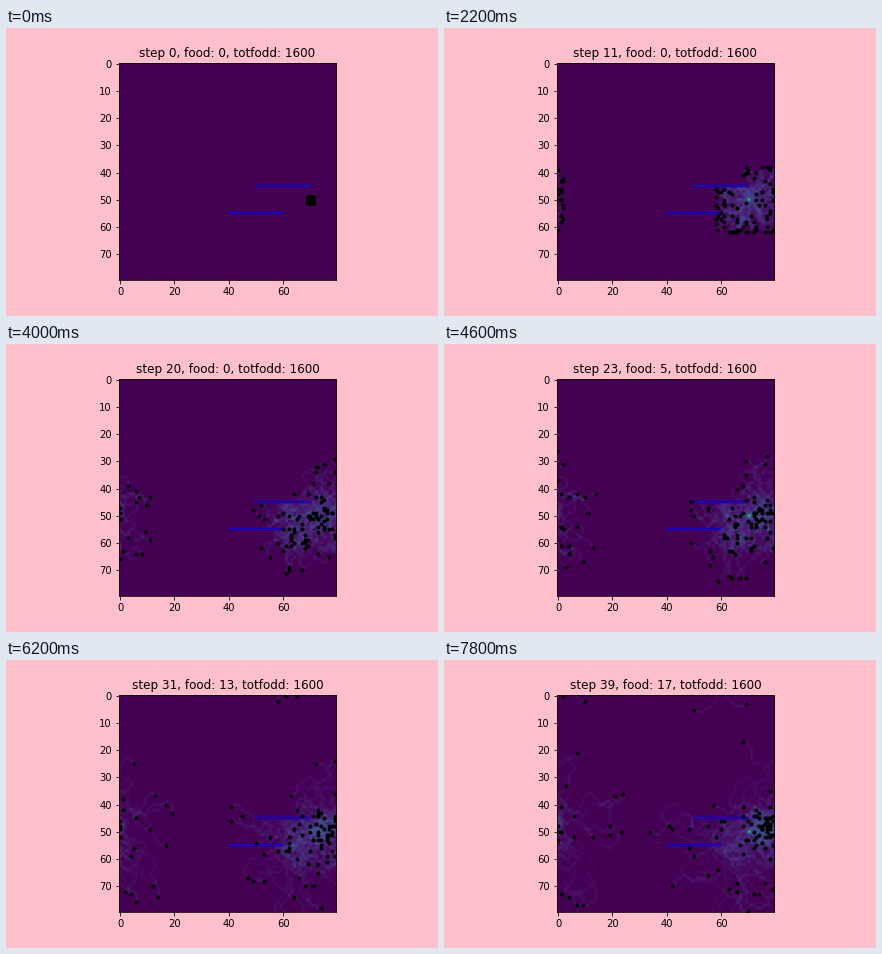
Write a matplotlib script that moves like this. It is 432x288 px and loops after 8 s.

```python
import numpy as np
import matplotlib.pyplot as plt
from matplotlib.animation import FuncAnimation

SIZE, STEPS, ANTS = 80, 40, 100
NEST = np.array([70, 50])
HAUNT = np.array([75, 49])
WALLS = [(50, 70, 45), (40, 60, 55)]
MOVES = np.array([(1, 0), (1, 1), (0, 1), (-1, 1),
                  (-1, 0), (-1, -1), (0, -1), (1, -1)])


def blocked(pos):
    x, y = pos % SIZE
    return any(y == wy and x0 <= x < x1 for x0, x1, wy in WALLS)


def turn_toward(head, delta):
    goal = round(np.arctan2(delta[1], delta[0]) / (np.pi / 4))
    diff = (goal - head + 4) % 8 - 4
    return head + np.sign(diff)


def simulate(seed):
    """Return the ant positions and the scent field of every step."""
    rng = np.random.default_rng(seed)
    pos = np.tile(NEST, (ANTS, 1))
    head = np.arange(ANTS) % 8
    scent = np.zeros((SIZE, SIZE))
    places, fields = [], []
    for step in range(STEPS):
        jitter = 0.12 if step < 8 else 0.3
        for i in range(ANTS):
            if step:
                head[i] += rng.choice([-1, 0, 1], p=[jitter, 1 - 2 * jitter, jitter])
            delta = HAUNT - pos[i]
            homing = i % 5 < 2 and step > 9 and abs(delta).max() > 3
            if homing and rng.random() < 0.65:
                head[i] = turn_toward(head[i], delta)
            head[i] %= 8
            while blocked(pos[i] + MOVES[head[i]]):
                head[i] = rng.integers(8)
            pos[i] += MOVES[head[i]]
        x, y = (pos % SIZE).T
        scent *= 0.95
        np.add.at(scent, (y, x), 0.045)
        scent = np.minimum(scent, 0.27)
        field = scent.copy()
        field[NEST[1], NEST[0]] = 0.65
        places.append((x, y))
        fields.append(field)
    return places, fields


places, fields = simulate(4)

fig = plt.figure(figsize=(6, 4), dpi=72, facecolor="pink")
fig.subplots_adjust(left=0.125, right=0.9, bottom=0.125, top=0.88)
ax = fig.add_subplot()
image = ax.imshow(fields[0], cmap="viridis", vmin=0, vmax=1)
for x0, x1, wy in WALLS:
    ax.plot([x0, x1], [wy, wy], color="blue", lw=1.5)
ants, = ax.plot([], [], "ko", ms=3)
ax.set_xlim(-0.5, SIZE - 0.5)
ax.set_ylim(SIZE - 0.5, -0.5)
ax.set_xticks(range(0, SIZE, 20))
ax.set_yticks(range(0, SIZE, 10))
title = ax.set_title("", fontsize=12)


def draw(step):
    food = int(np.interp(step, [20, 26, 31, 39], [0, 10, 13, 17]))
    title.set_text(f"step {step}, food: {food}, totfodd: 1600")
    image.set_data(fields[step])
    ants.set_data(*places[step])
    return image, ants, title


anim = FuncAnimation(fig, draw, frames=STEPS, interval=200,
                     repeat=True, repeat_delay=0)
plt.show()
```
